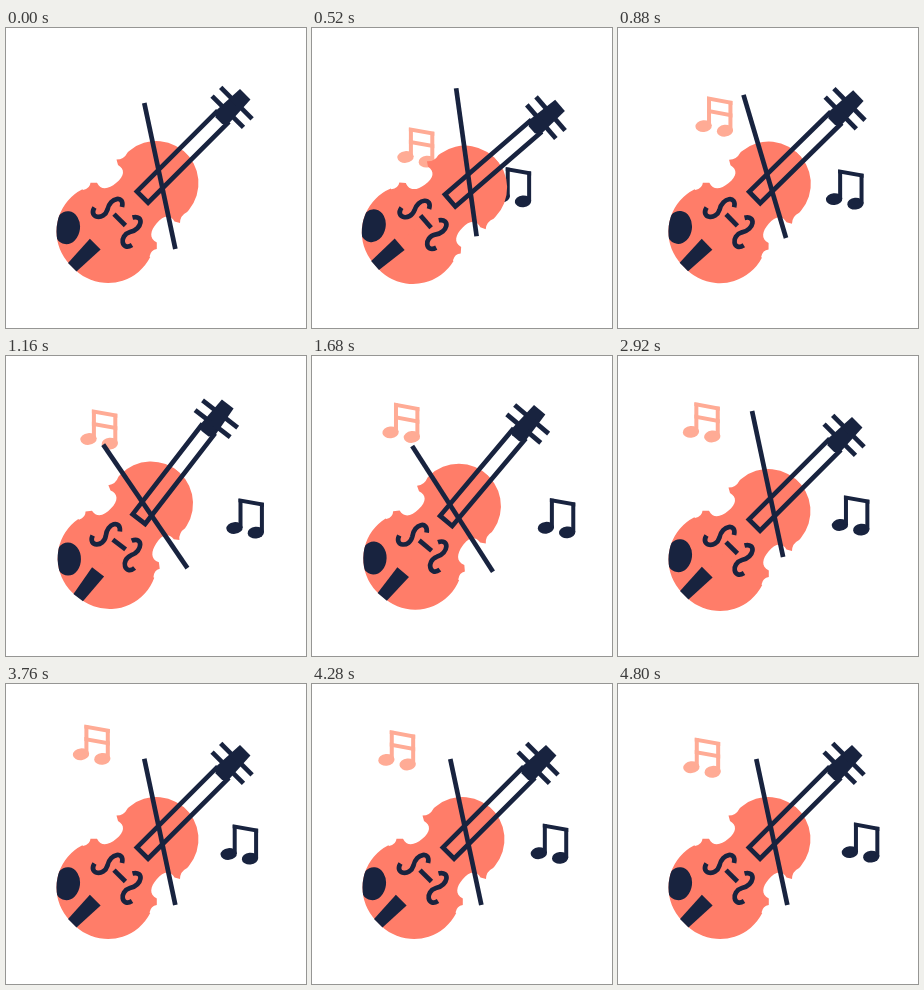
These frames come from a looping animation (300 px wide and 300 px high, 4.84 s). An HTML page with a canvas:

```html
<!DOCTYPE html>
<html lang="en">
<head>
<meta charset="utf-8">
<title>Violin</title>
<style>
  html, body { margin: 0; width: 100%; height: 100%; overflow: hidden; background: #fff; }
  canvas { display: block; width: 100vw; height: 100vh; }
</style>
</head>
<body>
<canvas id="stage" width="300" height="300"></canvas>
<script>
const ctx = document.getElementById('stage').getContext('2d');
const LOOP = 4840, STEP = 40;
const NAVY = '#18233f', CORAL = '#ff7d69', PINK = '#ffab95';
const LINE = 4.7, RAD = Math.PI / 180;
const BOW_HALF = 74.7, BOW_REST = 48.5;

const mix = (a, b, p) => a + (b - a) * p;
const clamp = p => Math.min(1, Math.max(0, p));
const ease = p => (1 - Math.cos(Math.PI * p)) / 2;
const phase = (t, from, to) => ease(clamp((t - from) / (to - from)));

// The violin leans into the up stroke, swings back, then settles.
function violinLean(t) {
  const settle = ease(clamp((t - 1280) / 1040) ** 0.85);
  const lean = mix(0, 4.5, phase(t, 0, 640));
  return mix(mix(lean, -8.4, phase(t, 640, 1280)), 0, settle) * RAD;
}

// The bow slides through a hinge point and tilts over for the middle stroke.
function bowPose(t) {
  const up = phase(t, 0, 640) - phase(t, 640, 1280) + phase(t, 2240, 2880) - phase(t, 2880, 3800);
  const over = phase(t, 640, 1280) - phase(t, 2240, 2880);
  const dip = phase(t, 640, 1280) - phase(t, 1280, 2240);
  return { slide: -BOW_REST - 20.5 * up + 1.6 * over + 6.5 * dip, tilt: (12 + 14.8 * over + 1.6 * dip) * RAD };
}

// A smooth path through a few [time, x, y] points.
function drift(path, t) {
  let i = 0;
  while (i < path.length - 2 && t >= path[i + 1][0]) i++;
  const span = path[i + 1][0] - path[i][0];
  const p = (t - path[i][0]) / span, q = 1 - p;
  const slope = (n, k) => {
    const a = path[Math.max(0, n - 1)], b = path[Math.min(path.length - 1, n + 1)];
    return (b[k] - a[k]) / (b[0] - a[0]) * span;
  };
  return [1, 2].map(k =>
    path[i][k] * (1 + 2 * p) * q * q + slope(i, k) * p * q * q +
    path[i + 1][k] * p * p * (3 - 2 * p) - slope(i + 1, k) * p * p * q);
}
const pinkPath = [[0, 118, 177], [520, 93.5, 129], [1160, 82.5, 83], [2900, 73, 76], [3700, 75, 70], [4840, 73.3, 83.7]];
const darkPath = [[0, 148, 165], [1160, 228.5, 172], [2900, 222, 169], [3760, 222.7, 170], [4840, 232.3, 168]];

function polygon(...points) {
  ctx.beginPath();
  points.forEach(([x, y]) => ctx.lineTo(x, y));
  ctx.fill();
}

function oval(x, y, rx, ry, turn) {
  ctx.beginPath();
  ctx.ellipse(x, y, rx, ry, turn, 0, 2 * Math.PI);
  ctx.fill();
}

// A bar across the violin's axis, in axis coordinates.
const crossBar = (y, half) => ctx.fillRect(-half, y - LINE / 2, 2 * half, LINE);

// Draws a shape and its reflection over the violin's axis.
function mirrored(draw) {
  draw();
  ctx.save();
  ctx.transform(0, -1, -1, 0, 305.5, 305.5);
  draw();
  ctx.restore();
}

function drawNote([x, y], color, stem, beams) {
  const left = stem - 2, right = stem + 23.4, top = -29.8, drop = 4.6;
  ctx.save();
  ctx.translate(x, y);
  ctx.fillStyle = color;
  oval(0, 0, 8.2, 5.9, -0.1);
  oval(21.3, drop, 8.2, 5.9, -0.1);
  ctx.fillRect(left, top + 0.8, 4, -top - 0.8);
  ctx.fillRect(right - 4, top + drop, 4, -top);
  for (let i = 0; i < beams; i++) {
    const b = top + i * 12.5;
    polygon([left, b], [right, b + drop], [right, b + drop + 4], [left, b + 4]);
  }
  ctx.restore();
}

function lowerBout(from, to) {
  ctx.arc(97.9, 203.5, 47.4, from * Math.PI, to * Math.PI, true);
}

function halfBody() {
  ctx.beginPath();
  ctx.arc(150.3, 155, 42, -0.22 * Math.PI, -0.74 * Math.PI, true);
  ctx.quadraticCurveTo(118, 131.5, 110.5, 131.5);
  ctx.lineTo(112, 137);
  ctx.bezierCurveTo(119, 141, 119, 148, 110, 155);
  ctx.bezierCurveTo(103, 161, 95, 163, 91, 154.7);
  ctx.lineTo(84.5, 154.7);
  ctx.quadraticCurveTo(84, 160.5, 77, 162);
  lowerBout(-0.65, -1.275);
  ctx.fill();
}

function soundHole() {
  ctx.beginPath();
  ctx.moveTo(88.5, 179.5);
  ctx.bezierCurveTo(82, 190, 98, 193, 101.5, 181.5);
  ctx.bezierCurveTo(104, 169, 119, 167, 116, 179);
  ctx.stroke();
}

// Parts along the axis: y runs from the scroll down to the tail.
function drawFittings() {
  ctx.save();
  ctx.translate(152.75, 152.75);
  ctx.rotate(Math.PI / 4);
  ctx.strokeRect(-7.9, -89, 15.8, 112);
  polygon([-7.4, -122.3], [7.4, -122.3], [9.2, -88.7], [4.6, -85], [-4.6, -85], [-9.2, -88.7]);
  crossBar(-109.8, 22.2);
  crossBar(-97.6, 22.2);
  crossBar(55.2, 8.1);
  polygon([-7.6, 89.8], [7.6, 89.8], [6, 122.3], [-6, 122.3]);
  ctx.restore();
}

function drawViolin() {
  ctx.fillStyle = CORAL;
  mirrored(halfBody);
  ctx.fillStyle = ctx.strokeStyle = NAVY;
  ctx.lineWidth = LINE;
  ctx.save();
  ctx.beginPath();
  lowerBout(2, 0);
  ctx.clip();
  oval(61, 199.7, 13, 16.5, 0.12);
  ctx.restore();
  mirrored(soundHole);
  drawFittings();
}

function drawBow({ slide, tilt }) {
  ctx.save();
  ctx.translate(163.9, 195.4);
  ctx.rotate(-tilt);
  ctx.fillRect(-LINE / 2, slide - BOW_HALF, LINE, 2 * BOW_HALF);
  ctx.restore();
}

function draw(now) {
  const t = Math.floor((now % LOOP) / STEP) * STEP;
  ctx.fillStyle = '#fff';
  ctx.fillRect(0, 0, 300, 300);
  drawNote(drift(pinkPath, t), PINK, 5.4, 2);
  drawNote(drift(darkPath, t), NAVY, 6, 1);
  ctx.save();
  ctx.translate(88, 194);
  ctx.rotate(violinLean(t));
  ctx.translate(-88, -194);
  drawViolin();
  drawBow(bowPose(t));
  ctx.restore();
}

let start;
function tick(now) {
  start ??= now;
  draw(now - start);
  requestAnimationFrame(tick);
}
draw(0);
requestAnimationFrame(tick);
</script>
</body>
</html>
```
